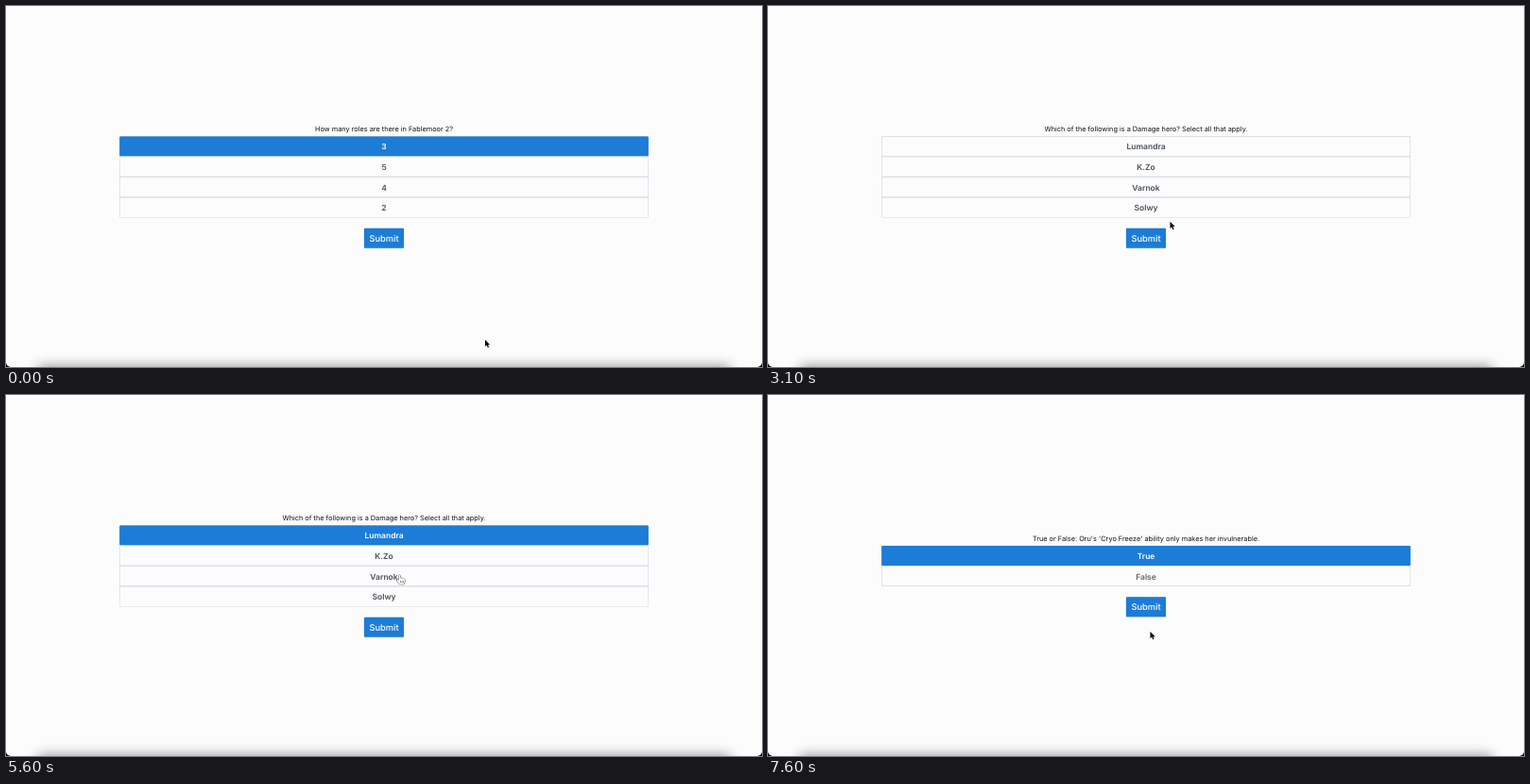
An HTML page with a canvas for the animation above (8000 ms loop, 800 by 383 pixels).

```html
<!DOCTYPE html>
<html lang="en">
<head>
<meta charset="utf-8">
<title>Quiz</title>
<style>
  html, body { margin: 0; width: 100%; height: 100%; overflow: hidden; background: #000; }
  #stage { position: relative; width: 800px; height: 383px; overflow: hidden; background: #fcfcfc; border-radius: 0 0 5px 5px; }
  #stage::after { content: ""; position: absolute; left: 36px; right: 36px; top: 384px; height: 20px; box-shadow: 0 0 13px 2px rgba(0, 0, 0, .42); }
  canvas { display: block; }
</style>
</head>
<body>
<div id="stage"><canvas id="view" width="800" height="383"></canvas></div>
<script>
const ctx = document.getElementById('view').getContext('2d');
const LOOP = 8000, STEP = 100;
const LEFT = 120, WIDTH = 560, ROW = 21.6;
const BLUE = '#1c7cd6', PALE = '#b4d3f0';

// Each answer carries the time at which it becomes selected.
const pages = [
  { from: 0, ask: 'How many roles are there in Fablemoor 2?', ink: '#555',
    answers: [['3', 0], ['5'], ['4'], ['2']] },
  { from: 2600, ask: 'Which of the following is a Damage hero? Select all that apply.', ink: '#49505a',
    answers: [['Lumandra', 4900], ['K.Zo'], ['Varnok', 5800], ['Solwy']] },
  { from: 7400, ask: "True or False: Oru's 'Cryo Freeze' ability only makes her invulnerable.", ink: '#666',
    answers: [['True', 0], ['False']] }
];
const presses = [[2300, 2600], [7200, 7400]];

// Pointer stops: time, x, y
const route = [
  [400, 507, 354], [700, 492, 333], [1000, 465, 297], [1200, 453, 281], [1300, 449, 277],
  [1800, 432, 258], [2200, 416.5, 242], [2900, 416.5, 242], [3200, 430, 222], [3800, 412, 152],
  [4100, 382, 133.5], [4700, 405, 147], [4900, 405, 147], [5500, 416.5, 191],
  [5900, 416.5, 191], [6500, 404.5, 251]
];

const arrow = new Path2D('M0 0V7.3L1.7 5.8 2.9 8.5 4.1 8 2.9 5.4H5.2Z');
const hand = new Path2D('M-1 .8Q0-.6 1 .8V3.6Q2 2.7 2.8 3.8 3.8 3.2 4.3 4.3 5.6 4 5.6 5.4V7Q5 8.4 4.6 9.7H-.4Q-1.6 7.6-3 6.2-3.7 4.7-2.3 4.8L-1 5.9Z');
const beam = new Path2D('M-2-4Q0-4 0-3Q0-4 2-4M0-3V3.4M-2 4.2Q0 4.2 0 3.2Q0 4.2 2 4.2M-1.1 .8H1.1');

function pointerAt(t) {
  const next = route.findIndex(p => p[0] > t);
  if (next === 0) return route[0].slice(1);
  if (next < 0) return route[route.length - 1].slice(1);
  const [t0, x0, y0] = route[next - 1], [t1, x1, y1] = route[next];
  const k = (t - t0) / (t1 - t0);
  return [x0 + (x1 - x0) * k, y0 + (y1 - y0) * k];
}

function text(str, y, size, weight, color) {
  ctx.font = `${weight} ${size}px Inter, sans-serif`;
  ctx.fillStyle = color;
  ctx.fillText(str, 400, y);
  return ctx.measureText(str).width;
}

function box(x, y, w, h, color) {
  ctx.fillStyle = color;
  ctx.beginPath();
  ctx.roundRect(x, y, w, h, 1);
  ctx.fill();
}

function drawPointer(x, y, kind) {
  ctx.save();
  ctx.translate(x, y);
  ctx.lineJoin = 'round';
  if (kind === 'beam') {
    ctx.strokeStyle = '#333';
    ctx.lineWidth = .9;
    ctx.stroke(beam);
  } else {
    const isHand = kind === 'hand';
    ctx.strokeStyle = isHand ? '#222' : '#fff';
    ctx.fillStyle = isHand ? '#fff' : '#000';
    ctx.lineWidth = isHand ? .9 : 1.2;
    const shape = isHand ? hand : arrow;
    ctx.stroke(shape);
    ctx.fill(shape);
    if (isHand) {
      ctx.lineWidth = .5;
      ctx.stroke(new Path2D('M1 6.2V8.2M2.5 6.2V8.2M4 6.2V8.2'));
    }
  }
  ctx.restore();
}

function draw(t) {
  const page = pages.findLast(p => t >= p.from);
  const height = page.answers.length * ROW;
  const top = 181.3 - height / 2;
  const bottom = top + height;
  const button = bottom + 11.3;
  const pressed = presses.some(([a, b]) => t >= a && t < b);

  ctx.clearRect(0, 0, 800, 383);
  const askWidth = text(page.ask, top - 4.7, 7.34, 400, '#111');

  page.answers.forEach(([label, since = Infinity], i) => {
    const y = top + i * ROW, chosen = t >= since;
    box(LEFT, y, WIDTH, ROW, '#d5d8db');
    box(LEFT + .6, y + .6, WIDTH - 1.2, ROW - 1.2, chosen ? BLUE : '#fcfcfc');
    if (chosen) box(LEFT + .2, y + .3, WIDTH - .4, ROW - .7, BLUE);
    text(label, y + 14.2, 8.5, 600, chosen ? '#fff' : page.ink);
  });

  box(378.7, button + .4, 42.6, 21.1, pressed ? '#d5e3f0' : '#b9cde0');
  box(379, button, 42, 21, pressed ? PALE : BLUE);
  text('Submit', button + 14, 9.3, 500, '#fff');

  const [x, y] = pointerAt(t);
  const inside = (w, a, b) => Math.abs(x - 400) < w / 2 && y > a && y < b;
  const kind = inside(askWidth, top - 12, top - 1) ? 'beam'
    : inside(WIDTH, top, bottom) || inside(42, button, button + 21) ? 'hand' : 'arrow';
  drawPointer(x, y, kind);
}

ctx.textAlign = 'center';
ctx.textRendering = 'geometricPrecision';
const start = performance.now();
function tick(now) {
  const t = Math.max(0, now - start) % LOOP;
  draw(Math.floor(t / STEP) * STEP);
  requestAnimationFrame(tick);
}
tick(start);
</script>
</body>
</html>
```
